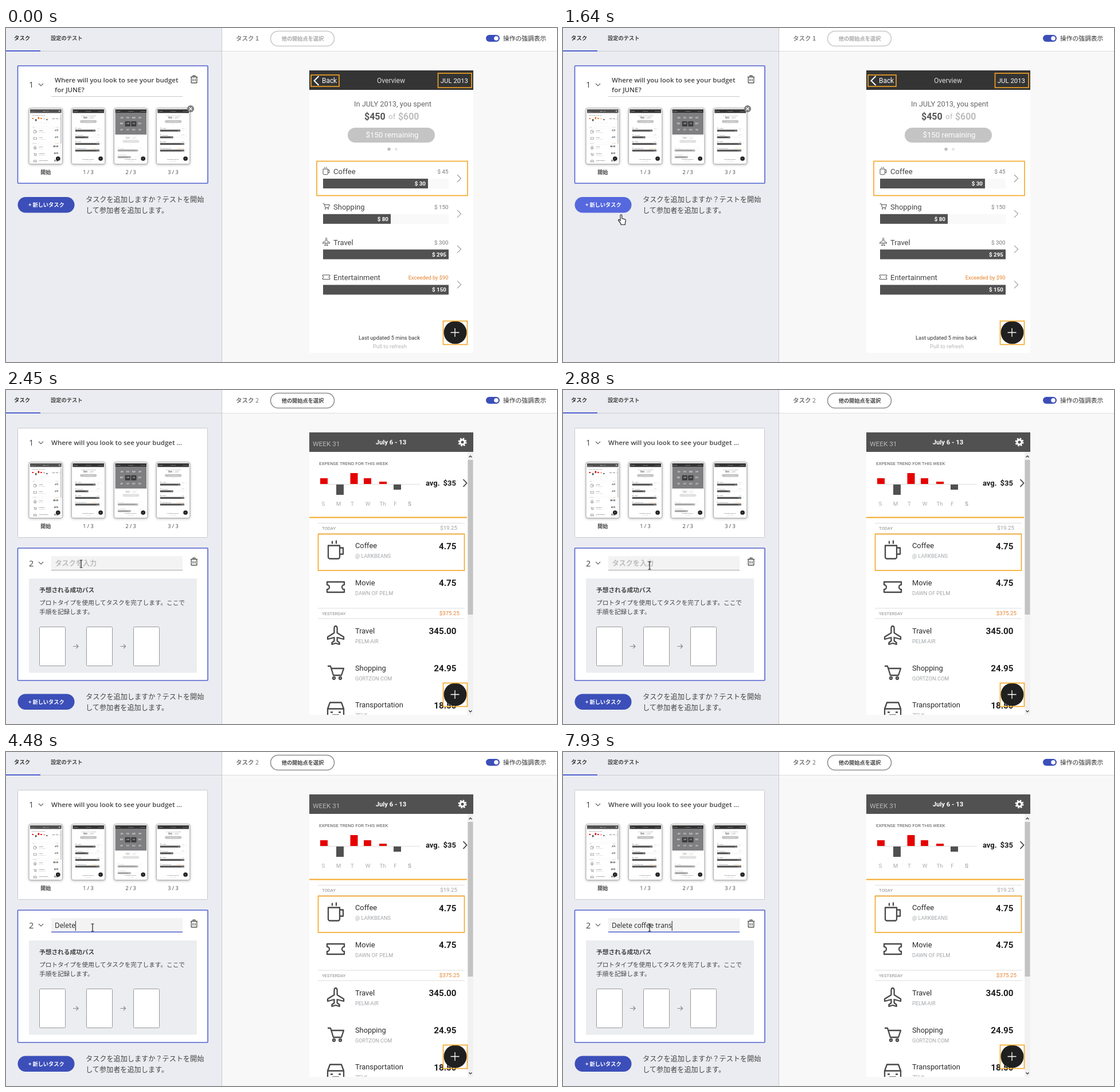
An HTML page that plays this animation: 961x583 px, repeating every 8000 ms.

```html
<!DOCTYPE html>
<html lang="ja">
<head>
<meta charset="utf-8">
<title>Task editor</title>
<style>
html, body { margin: 0; width: 100%; height: 100%; overflow: hidden; background: #f8f8f8; }
svg { display: block; width: 961px; height: 583px; }
text { white-space: pre; }
.j { font-family: "Noto Sans CJK JP", "Noto Sans CJK", sans-serif; }
.o { font-family: "Open Sans", sans-serif; }
.r { font-family: Roboto, sans-serif; }
.b { font-weight: 700; }
.s { font-weight: 600; }
.e { text-anchor: end; }
.m { text-anchor: middle; }
.icon { fill: none; stroke: #484848; stroke-width: 2.3; stroke-linejoin: round; }
.hl { fill: none; stroke: #f5a623; stroke-width: 1.6; }
.line { fill: none; stroke: #555; stroke-width: 1.4; }
.thumb { filter: drop-shadow(0 1px 2px #0004); }
</style>
</head>
<body>
<svg id="stage" viewBox="0 0 961 583"></svg>
<script>
const LOOP = 8000, SWITCH = 1720, FOCUS = 3100;
const INK = '#444', BLUE = '#3c4fb9', EDGE = '#5061cf';

const txt = (x, y, size, fill, str, cls = 'r', extra = '') =>
  `<text x="${x}" y="${y}" font-size="${size}" fill="${fill}" class="${cls}" ${extra}>${str}</text>`;
const box = (x, y, w, h, fill, extra = '') =>
  `<rect x="${x}" y="${y}" width="${w}" height="${h}" fill="${fill}" ${extra}/>`;
const path = (d, stroke, width = 1, extra = '') =>
  `<path d="${d}" fill="none" stroke="${stroke}" stroke-width="${width}" ${extra}/>`;
const icon = (name, x, y, k = 1) =>
  `<use href="#${name}" transform="translate(${x} ${y}) scale(${k})"/>`;
const frame = (x, y, w, h) => `<rect class="hl" x="${x}" y="${y}" width="${w}" height="${h}"/>`;
const use = id => `<use href="#${id}"/>`;

const icons = {
  cup: 'M-13-8h20v20a3 3 0 0 1-3 3h-14a3 3 0 0 1-3-3zM7-4h6v11h-6M-6-16v5M1-17v6',
  ticket: 'M-15-9h30v5a4 4 0 0 0 0 8v5h-30v-5a4 4 0 0 0 0-8z',
  plane: 'M0-16c-1.8 0-2.6 2-2.6 5v7l-11.4 7v4l11.4-3v6l-4 3v3l6.6-2 6.6 2v-3l-4-3v-6l11.4 3v-4l-11.4-7v-7c0-3-.8-5-2.6-5z',
  cart: 'M-14-11h5l5 16h14l4-12h-22M-5 10a2 2 0 1 0 4 0a2 2 0 1 0-4 0M6 10a2 2 0 1 0 4 0a2 2 0 1 0-4 0',
  car: 'M-14 12v-13l4-11h20l4 11v13M-14-1h28M-9 5h4M5 5h4M-6 10h12',
  trash: 'M-6-4h12M-2-4v-2.3h4v2.3M-4.8-4v10.3h9.6v-10.3M-1.7-1v4.5M1.7-1v4.5'
};

const chevron = (x, y) => path(`M${x - 4} ${y - 2}l4 4 4-4`, '#666', 1.2);
const trash = y => `<path d="${icons.trash}" class="line" stroke-linejoin="round" transform="translate(328 ${y})"/>`;

// Budget screen
const ovHead = box(529, 74, 286, 34, '#343434')
  + path('M545.5 84l-8 8 8 8', '#fff', 2)
  + txt(551, 96, 11.9, '#fff', 'Back') + txt(671.5, 95.5, 12.1, '#ddd', 'Overview', 'r m')
  + txt(806, 96, 11.4, '#fff', 'JUL 2013', 'r e');

const budget = ([name, pic, total, spent, w, color = '#777'], i) => {
  const y = i * 61.8;
  return icon(pic, 558.5, 249.5 + y, .42)
    + txt(571, 255 + y, 13, INK, name)
    + txt(771.5, 254 + y, color == '#777' ? 9.8 : 9.3, color, total, 'r e')
    + box(553, 263 + y, 219, 17, '#f9f9f9') + box(553, 263 + y, w, 17, '#515151')
    + txt(549 + w, 275 + y, 9.8, '#fff', spent, 'r b e')
    + path(`M787 ${256 + y}l6.5 6.5-6.5 6.5`, '#999', 1.1);
};
const ovBody = txt(674.5, 136.5, 12.8, '#666', 'In JULY 2013, you spent', 'r m')
  + txt(625, 160, 16, '#555', '$450', 'r b') + txt(667, 159, 13.5, '#bbb', 'of')
  + txt(684, 160, 15.8, '#bdbdbd', '$600', 'r b')
  + box(596, 174, 152, 26, '#c4c4c4', 'rx="13"')
  + txt(673.5, 191, 13.3, '#fff', '$150 remaining', 'r m')
  + '<circle cx="668" cy="211.5" r="2.7" fill="#bdbdbd"/><circle cx="680.5" cy="211.5" r="2.5" fill="#e6e6e6"/>'
  + [['Coffee', 'cup', '$ 45', '$ 30', 183],
     ['Shopping', 'cart', '$ 150', '$ 80', 118],
     ['Travel', 'plane', '$ 300', '$ 295', 219],
     ['Entertainment', 'ticket', 'Exceeded by $90', '$ 150', 219, '#e5802b']].map(budget).join('');
const ovFoot = txt(668.5, 544, 9.35, '#333', 'Last updated 5 mins back', 'r m')
  + txt(669.5, 559, 9.5, '#b5b5b5', 'Pull to refresh', 'r m');
const fab = '<circle cx="783.5" cy="531.5" r="20" fill="#202020"/>' + path('M775.5 531.5h15M783 524v15', '#fff', 1.3);

// Weekly screen
const bars = [[548, 154, 10, 1], [576, 165, 18], [600.5, 145, 19, 1], [624, 154, 10, 1], [651, 160, 4, 1], [676, 165, 9]]
  .map(([x, y, h, up]) => box(x, y, 13, h, up ? 'var(--bar)' : '#505050')).join('');
const days = [['S', 553.5], ['M', 580], ['T', 604], ['W', 631], ['Th', 657], ['F', 679], ['S', 704]]
  .map(([d, x], i) => txt(x, 202, 9.8, i == 6 ? '#888' : '#a9adb3', d, 'r m')).join('');
const section = (y, name, sum, right, color) =>
  path(`M544 ${y - 11.5}h256M544 ${y + 6.5}h256`, '#ddd')
  + txt(551, y, 7.7, '#888', name) + txt(right, y, 9.7, color, sum, 'r e');
const expense = ([name, place, sum, pic, y]) => icon(pic, 575, y)
  + txt(609, y - 3.5, 12.8, '#2b2b2b', name) + txt(609, y + 13.5, 9.2, '#a3a6aa', place)
  + txt(785.5, y - 2, 15.2, '#1d1d1d', sum, 'r b e');
const gear = '<g stroke="#fff" fill="none"><circle cx="796" cy="91" r="4" stroke-width="3"/>'
  + '<circle cx="796" cy="91" r="6.3" stroke-width="2.4" stroke-dasharray="2.6 2.35"/></g>';
const week = box(529, 74, 286, 493, '#fff') + box(529, 74, 286, 34, '#515151')
  + txt(535, 98, 11.8, '#b8b8b8', 'WEEK 31') + txt(671.5, 95, 11.3, '#fff', 'July 6 - 13', 'r b m') + gear
  + txt(546, 131, 8, '#555', 'EXPENSE TREND FOR THIS WEEK')
  + path('M548 164.5h174', '#ddd') + bars + days
  + txt(732, 166.5, 13, '#1d1d1d', 'avg.', 'r b') + txt(785, 166.5, 13, '#1d1d1d', '$35', 'r b e')
  + path('M797.5 156l6 6.5-6 6.5', INK, 1.8)
  + section(244, 'TODAY', '$19.25', 787, '#a0a0a0') + section(392.5, 'YESTERDAY', '$375.25', 791, '#e5802b')
  + [['Coffee', '@ LARKBEANS', '4.75', 'cup', 279.5],
     ['Movie', 'DAWN OF PELM', '4.75', 'ticket', 344],
     ['Travel', 'PELM-AIR', '345.00', 'plane', 428],
     ['Shopping', 'GORTZON.COM', '24.95', 'cart', 493],
     ['Transportation', 'ZELK', '18.50', 'car', 557.5]].map(expense).join('')
  + box(805, 108, 10, 459, '#f1f1f1') + box(805.5, 122, 9, 270, '#c3c3c3')
  + path('M807.5 117.5l2.5-2.5 2.5 2.5M807.5 559.5l2.5 2.5 2.5-2.5', '#444', 1.5);

// Thumbnails reuse the screens inside a white margin
const months = 'JAN FEB MAR APR MAY JUN JUL AUG SEP OCT NOV DEC'.split(' ').map((m, i) => {
  const x = 589 + i % 4 * 55, y = 152 + (i >> 2) * 57;
  return (i == 5 || i == 6 ? box(x - 24, y - 24, 47, 47, '#3a3a3a') : '') + txt(x, y + 5, 14, '#fff', m, 'r m');
}).join('');
const overview = box(529, 74, 286, 493, '#fff') + use('ovBody') + use('ovHead') + use('ovFoot') + use('fab');
const picker = box(529, 74, 286, 493, '#fff')
  + '<g clip-path="url(#lower)" opacity=".55"><use href="#ovBody" y="184"/></g>'
  + box(529, 108, 286, 200, '#7f7f82') + months + use('ovHead') + use('ovFoot') + use('fab');
const thumb = (x, inner, label, cls) =>
  `<g class="thumb">${box(x, 140, 58.5, 97.5, '#fff', 'rx="3" stroke="#a8a8ac"')}</g>`
  + `<g transform="translate(${x + 1.9} 142) scale(.192 .188) translate(-529 -74)" clip-path="url(#screen)">${inner}</g>`
  + txt(x + 29.2, 255, 9, INK, label, cls);

const addRow = '<g id="addRow"><rect id="addBtn" x="20.5" y="295" width="99" height="27.5" rx="13.7"/>'
  + txt(70.3, 312, 9.2, '#fff', '+ 新しいタスク', 'j b m')
  + txt(139, 304, 12.15, INK, 'タスクを追加しますか？テストを開始', 'j')
  + txt(139, 323, 12.15, INK, 'して参加者を追加します。', 'j') + '</g>';

const before = '<g id="before">'
  + box(20.5, 66, 331.5, 205, '#fff', `stroke="${EDGE}" stroke-width="1.6" rx="1"`)
  + txt(40, 104, 14.5, INK, '1', 'o') + chevron(61, 99)
  + txt(85, 95, 11.5, INK, 'Where will you look to see your budget', 'o s')
  + txt(85, 112, 11.5, INK, 'for JUNE?', 'o s') + path('M79 119.5h229', '#c8c8c8') + trash(89.5)
  + txt(401, 22, 10.5, '#888', 'タスク 1', 'j b')
  + box(461.5, 5.5, 111, 26, '#fff', 'rx="13" stroke="#c9c9c9" stroke-width="1.6"')
  + txt(517.5, 22, 9.2, '#aaa', '他の開始点を選択', 'j b m')
  + box(529, 74, 286, 493, '#fff') + use('ovBody') + use('ovHead') + use('ovFoot') + use('fab')
  + frame(532, 82, 49, 20) + frame(753.5, 79, 58.5, 25) + frame(542, 232.5, 263, 60) + frame(762.5, 511.5, 42, 41)
  + '</g>';

const slot = x => box(x + .5, 413.5, 45, 68, '#fff', 'rx="2" stroke="#999"');
const arrow = x => path(`M${x} 447.5h9M${x + 5.5} 444l3.5 3.5-3.5 3.5`, '#888', 1.2);
const after = '<g id="after">'
  + box(20.5, 66.5, 331, 191, '#fff', 'stroke="#c6c8d0" rx="1"')
  + txt(40, 97, 14.5, INK, '1', 'o') + chevron(61, 92)
  + txt(79, 96, 11.5, INK, 'Where will you look to see your budget ...', 'o s')
  + box(20.5, 276, 331.5, 231, '#fff', `stroke="${EDGE}" stroke-width="1.6" rx="1"`)
  + txt(40, 308, 14.5, INK, '2', 'o') + chevron(61, 302) + trash(299.5)
  + box(79, 290, 229, 25, '#f3f3f3', 'id="field"') + path('M79 314.5h229', '#a5a5a5', 1)
  + path('M79 314.2h229', EDGE, 1.6, 'id="focus"')
  + txt(85.5, 307.3, 12.1, '#bdbdbd', 'タスクを入力', 'j b', 'id="hint"')
  + txt(85, 307, 11.9, '#222', '', 'o', 'id="typed"') + box(85, 295, 1, 17, '#222', 'id="caret"')
  + box(40, 329, 293, 164.5, '#ecedf1')
  + txt(58, 353, 10.7, INK, '予想される成功パス', 'j b')
  + txt(58, 375, 10.65, INK, 'プロトタイプを使用してタスクを完了します。ここで', 'j')
  + txt(58, 391, 10.65, INK, '手順を記録します。', 'j')
  + slot(58) + slot(140) + slot(222) + arrow(117) + arrow(199.5)
  + txt(401, 22, 10.5, '#777', 'タスク <tspan font-weight="400">2</tspan>', 'j b')
  + box(461.5, 5.5, 111, 26, '#fff', 'rx="13" stroke="#8f8f8f" stroke-width="1.6"')
  + txt(517.5, 22, 9.2, INK, '他の開始点を選択', 'j b m')
  + `<g clip-path="url(#screen)">${use('week')}`
  + path('M529 222.5h275', '#f5a623', 1.8) + frame(544.5, 251.5, 255, 63.5)
  + `<g id="fabLayer">${use('fab')}${frame(762.5, 511.5, 42, 41)}</g></g></g>`;

const def = (id, inner) => `<g id="${id}">${inner}</g>`;
const stage = document.getElementById('stage');
stage.innerHTML = '<defs><clipPath id="screen"><rect x="529" y="74" width="286" height="493"/></clipPath>'
  + '<clipPath id="lower"><rect x="529" y="308" width="286" height="220"/></clipPath>'
  + Object.keys(icons).map(k => `<path id="${k}" class="icon" d="${icons[k]}"/>`).join('')
  + def('ovHead', ovHead) + def('ovBody', ovBody) + def('ovFoot', ovFoot) + def('fab', fab) + def('week', week) + '</defs>'
  + box(0, 0, 961, 583, '#f8f8f8') + box(377, 0, 584, 40, '#fff') + path('M377 40.5h584', '#dedede')
  + box(0, 0, 376, 583, '#ebecf1') + path('M376.5 0v583M0 40.5h376', '#cacbd3') + box(0, 39, 60, 2, EDGE)
  + txt(14, 21, 9.4, '#333', 'タスク', 'j b') + txt(78, 21, 9.25, INK, '設定のテスト', 'j b')
  + box(837, 12, 24, 12, BLUE, 'rx="6"') + '<circle cx="855" cy="18" r="3.8" fill="#fff"/>'
  + txt(867, 22, 10.75, '#333', '操作の強調表示', 'j')
  + before + after
  + '<g id="thumbs">' + thumb(40, use('week') + use('fab'), '開始', 'j b m')
  + thumb(114.3, overview, '1 / 3', 'o m') + thumb(188.4, picker, '2 / 3', 'o m') + thumb(262.3, overview, '3 / 3', 'o m') + '</g>'
  + '<g id="remove"><circle cx="322" cy="141" r="6" fill="#7d7d7d"/>' + path('M319.5 138.5l5 5m0-5l-5 5', '#fff', 1.3) + '</g>'
  + addRow
  + '<g id="cursor"><path id="arrow" d="M0 0v16l3.8-3.6 2.6 6 2.4-1-2.6-6h5.2z" fill="#fff" stroke="#111"/>'
  + '<path id="hand" d="M-1 1.2a1.4 1.4 0 0 1 2.8 0v5.3l5 1.2c1.4.4 1.7 1.2 1.5 2.6l-.9 4.4v2.6h-7.4l-.4-2.2-4-5.2c-.6-1 .8-2.2 1.9-1.2l1.5 1.6z" fill="#fff" stroke="#111" stroke-width="1.1"/>'
  + path('M-2.5-6h1.8l.7.6.7-.6h1.8M0-5.4v11.8M-2.5 7h1.8l.7-.6.7.6h1.8', '#222', 1.2, 'id="beam"') + '</g>';

const el = id => document.getElementById(id);
const show = (id, on) => { el(id).style.display = on ? '' : 'none'; };
const move = (id, x, y) => el(id).setAttribute('transform', `translate(${x} ${y})`);

// time, x, y of the pointer tip
const track = [
  [130, 856, 576], [300, 762, 522], [480, 540, 445], [660, 300, 380], [820, 145, 340],
  [950, 103, 328], [1180, 103, 328], [1500, 101, 326], [2280, 101, 326], [2420, 131, 303],
  [2530, 131, 303], [2850, 151, 306], [LOOP, 151, 306]
];
const phrase = 'Delete coffee trans';
const keys = [3790, 3930, 4070, 4200, 4340, 4480, 5630, 5810, 5990, 6170, 6350, 6530, 6700, 6850, 7180, 7340, 7500, 7700, 7930];

function pointer(t) {
  const i = Math.max(1, track.findIndex(p => p[0] > t));
  const [t0, x0, y0] = track[i - 1], [t1, x1, y1] = track[i];
  const k = Math.max(0, (t - t0) / (t1 - t0));
  return [x0 + (x1 - x0) * k, y0 + (y1 - y0) * k];
}

function draw(t) {
  const added = t >= SWITCH, hover = t >= 880 && !added;
  show('before', !added);
  show('after', added);
  show('remove', !added);
  move('thumbs', 0, added ? -14 : 0);
  move('addRow', 0, added ? 235.5 : 0);
  el('addBtn').setAttribute('fill', hover ? '#5568dd' : BLUE);
  stage.style.setProperty('--bar', added ? '#e60000' : '#ee7a20');

  const rise = Math.min(1, Math.max(0, (t - 2200) / 200));
  move('fabLayer', 0, 60 * (1 - rise) ** 2);

  const count = keys.filter(k => k <= t).length;
  show('field', t >= 2390);
  show('focus', t >= FOCUS);
  show('hint', !count);
  el('typed').textContent = phrase.slice(0, count);
  show('caret', t >= 3660);
  if (added) el('caret').setAttribute('x', 85 + (count ? el('typed').getComputedTextLength() : 1));

  show('cursor', t >= 130);
  move('cursor', ...pointer(t));
  show('arrow', t < 880);
  show('hand', t >= 880 && t < 2370);
  show('beam', t >= 2370);
}

const start = performance.now();
function tick() {
  draw((performance.now() - start) % LOOP);
  requestAnimationFrame(tick);
}
tick();
</script>
</body>
</html>
```
